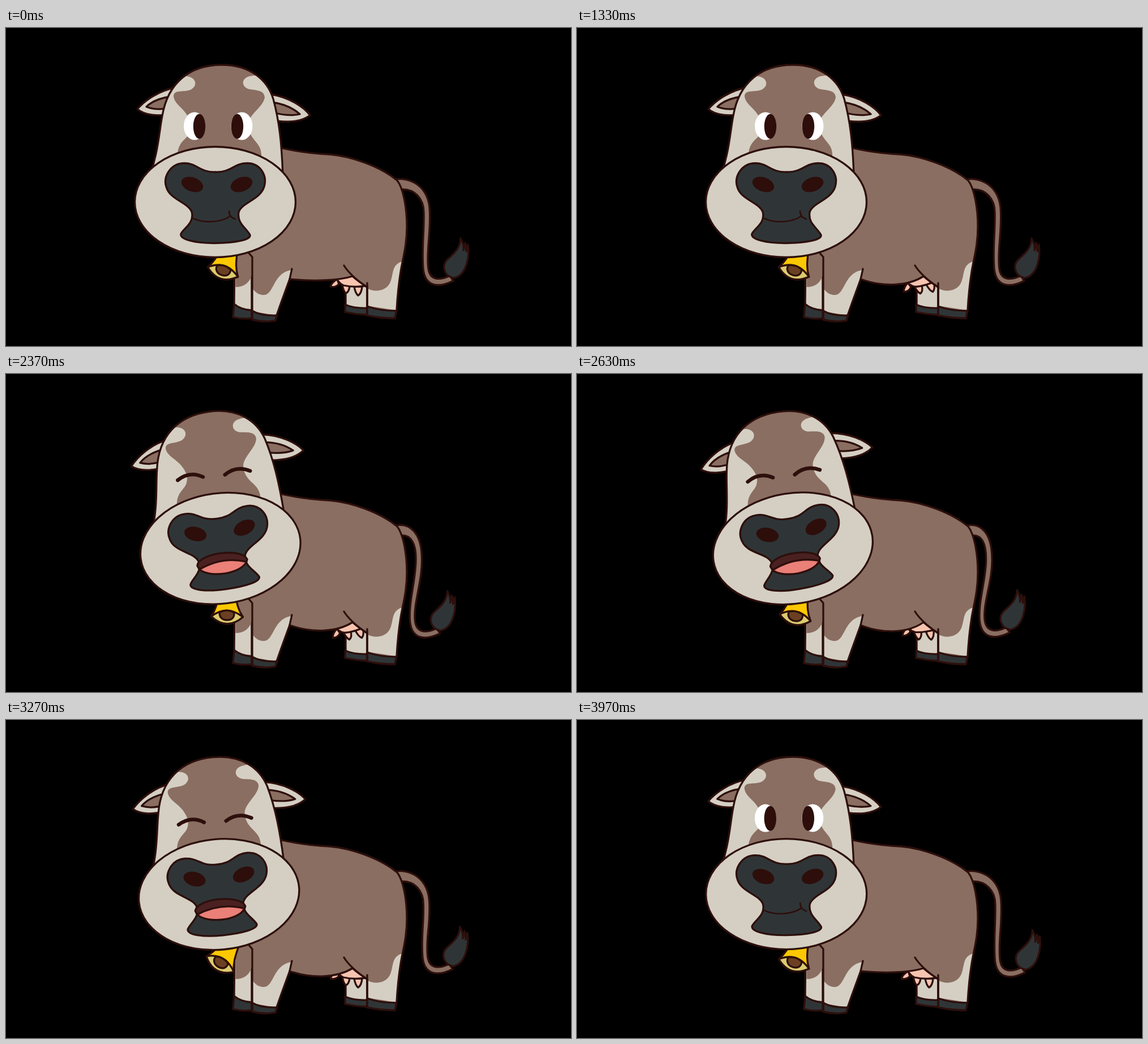
An HTML page that plays this animation: 998x561 px, repeating every 4010 ms.

```html
<!DOCTYPE html>
<html lang="en">
<head>
<meta charset="utf-8">
<title>Cow</title>
<style>
html, body { margin: 0; width: 100%; height: 100%; overflow: hidden; background: #000; }
svg { display: block; width: 100vw; height: 100vh; }
.line { stroke: #2d0f0c; stroke-width: 3.3; stroke-linejoin: round; stroke-linecap: round; }
.brown { fill: #8a6e61; }
.light { fill: #d5cfc3; }
.dark { fill: #2f3537; }
.ink { fill: #2d0e0b; }
.pink { fill: #f7c4af; }
.none { fill: none; }
</style>
</head>
<body>
<svg viewBox="0 0 998 561">
  <defs>
    <path id="skull" d="M250 270C269 225 270 185 276 155C286 96 325 65 381 65C432 65 462 92 472 125C483 165 487 205 489 260L480 300H270Z"/>
    <clipPath id="skullClip"><use href="#skull"/></clipPath>
  </defs>

  <path id="tail" class="brown line"/>
  <path id="tuft" class="dark line" d="M791 441C774 438 769 420 779 409C792 397 802 390 803 371C807 379 809 386 808 392C810 388 811 383 811 379C813 385 813 391 813 394C815 390 816 386 816 382C819 402 814 436 791 441Z"/>

  <g id="farLegs">
    <path class="light line" d="M404 395L403 487 401 510Q418 514 434 512V395Z"/>
    <path class="brown" d="M405.500 395V457C420 457 430 450 434 436V395Z"/>
    <path class="dark line" d="M403 487Q415 497 434 498V512Q418 514 401 510Z"/>
    <path class="light line" d="M600 440V488L599 501Q620 505 638 506V440Z"/>
    <path class="dark line" d="M599 488Q615 495 638 494V506Q618 505 599 501Z"/>
  </g>

  <g id="udder" class="pink line">
    <path d="M585 443Q575 449 573 456Q581 459 588 452Z"/>
    <path d="M594 453Q596 464 600 468Q606 466 607 455Z"/>
    <path d="M615 456Q617 468 622 472Q628 468 629 456Z"/>
    <path d="M582 436Q586 450 596 454Q614 458 634 455L630 430Z"/>
  </g>

  <path id="body" class="brown"/>
  <path class="light" d="M435 459C440 466 446 471 455 471C466 471 470 457 477 446C485 433 495 428 505 427L501 443 485 487 478 507 435 500Z"/>
  <path class="light" d="M638 459C650 467 672 465 679 448C685 433 681 417 700 412L697 430C693 455 691 480 690 498L638 490Z"/>
  <path class="dark line" d="M435 499Q450 508 479 507L476 516Q456 520 435 515Z"/>
  <path class="dark line" d="M638 491Q660 499 690 499L687 512Q665 513 638 507Z"/>
  <path id="bodyLine" class="none line"/>
  <path class="none line" d="M597 419C605 432 620 445 637 457M638 450V507M505 425L501 443"/>

  <g id="bell">
    <path fill="#fcc800" class="line" d="M377 385C373 405 371 415 363 428H419C410 415 408 405 404 385Z"/>
    <path fill="#dccb6e" class="line" d="M363 428Q390 406 419 428Q391 453 363 428Z"/>
    <path fill="#6b4022" class="line" d="M378 420Q391 414 403 420C405 430 398 434 391 434C383 434 376 429 378 420Z"/>
  </g>

  <g id="head">
    <path class="light line" d="M300 105C270 110 245 128 232 143C245 154 268 156 290 152Z"/>
    <path class="brown line" d="M290 121C270 124 256 131 248 139C260 144 275 144 288 141Z"/>
    <path class="light line" d="M468 117C500 122 526 139 537 154C522 165 503 167 478 164Z"/>
    <path class="brown line" d="M470 131C492 134 508 142 519 152C505 155 492 154 475 150Z"/>
    <use href="#skull" class="light"/>
    <path class="brown" clip-path="url(#skullClip)" d="M314 85C335 84 341 101 326 109C312 114 297 108 296 120C297 133 311 140 318 151C327 164 329 175 325 184C321 196 305 198 303 222V240H451V222C450 200 428 197 428 170C428 152 455 140 457 122C456 110 443 110 430 108C414 104 415 86 434 84.500C440 83 447 85 454 84L430 50H330Z"/>
    <use href="#skull" class="none line"/>
    <g id="awakeEyes">
      <ellipse cx="333" cy="173" rx="19" ry="24.500" fill="#fff"/>
      <ellipse cx="341.500" cy="173.500" rx="10.700" ry="22" class="ink"/>
      <ellipse cx="416.500" cy="173" rx="19" ry="24.500" fill="#fff"/>
      <ellipse cx="408.500" cy="173.500" rx="10.700" ry="22" class="ink"/>
    </g>
    <path id="shutEyes" class="none line" style="stroke-width:6.500" d="M310 178Q333 164 355 178M394 179Q416 165 439 178"/>
    <ellipse class="light line" cx="369.500" cy="307" rx="142" ry="97.500"/>
    <path class="dark line" d="M370 254C342 255 338 238.500 315 238.500C291 238.500 277 262 283 280C289 303 321 307 328 324C333 344 315 352 309 363C306 373 335 380 370 379.500C405 379 433 374 431 365C424 352 408 345 411 325C416 308 449 303 456 280C462 260 449 238.500 426 238.500C402 238.500 398 255 370 254Z"/>
    <ellipse class="ink" cx="329" cy="276" rx="20" ry="12.500" transform="rotate(20 329 276)"/>
    <ellipse class="ink" cx="416" cy="276" rx="20" ry="12.500" transform="rotate(-20 416 276)"/>
    <path id="smile" class="none line" style="stroke-width:2.700" d="M331 336C350 345 380 343 396 332M394 323C394 330 398 335 405 337"/>
    <g id="moo">
      <path fill="#4a2020" class="line" d="M325 332C330 310 408 310 414 332C408 357 330 357 325 332Z"/>
      <path fill="#ea8078" class="line" d="M328 339Q370 321 412 336C400 356 345 357 328 339Z"/>
    </g>
  </g>
</svg>
<script>
const LOOP = 4010, MOVE = 1600, PEAK = 2660;
const $ = id => document.getElementById(id);

// Soft-edged ramp from 0 to 1 between two times.
function ramp(t, from, to) {
  const u = Math.min(1, Math.max(0, (t - from) / (to - from)));
  return (u + u * u * (3 - 2 * u)) / 2;
}

// Sway that fades in and out while the cow moos.
function sway(t, beats, decay = 0) {
  const u = Math.max(0, (t - MOVE) / (LOOP - MOVE));
  return Math.sin(Math.PI * u) * Math.sin(2 * Math.PI * beats * u) * Math.exp(-decay * u);
}

function tailPath(dx, dy) {
  const mid = (x, y) => `${x + dx * .6} ${y} `;
  const low = (x, y) => `${x + dx} ${y + dy} `;
  return `M684 268C712 261 ${mid(748, 278)}${mid(748.5, 325)}`
    + `C${mid(750, 365)}${low(742, 395)}${low(746, 425)}`
    + `C${low(749, 445)}${low(765, 446)}${low(784, 437)}`
    + `L${low(790, 446)}C${low(762, 460)}${low(740, 455)}${low(737, 425)}`
    + `C${low(734, 390)}${mid(739, 360)}${mid(738, 325)}`
    + `C${mid(738, 302)}${722 + dx * .2} 282 696 285Z`;
}

function bodyPath(sag) {
  return 'M435 514V404L428 396 420 300 440 208 487 212C520 219 545 222 572 223'
    + 'C608 226 660 243 691 269C702 283 708 318 708 350C708 385 701 405 697 430'
    + 'C693 455 691 480 690 498L687 512Q665 512 638 507V457C630 452 620 445 612 438'
    + `C586 ${446 + sag * .8} 542 ${447 + sag} 501 443L485 487 478 507 476 516Q456 520 435 514Z`;
}

function move(id, transform) { $(id).setAttribute('transform', transform); }
function show(id, on) { $(id).style.display = on ? '' : 'none'; }

function render(t) {
  const tilt = 9.5 * (ramp(t, MOVE, PEAK) - ramp(t, PEAK, LOOP));
  const ring = 17.8 - 36 * sway(t, 1.07, 1.3);
  const tailX = -28 * sway(t, .71), tailY = 14 * sway(t, .86);
  const breathIn = ramp(t, 0, 1300), deepen = ramp(t, 2370, 2930), breathOut = ramp(t, 2930, 3900);
  const body = bodyPath(11 * breathIn + 4 * deepen - 15 * breathOut);
  const mooing = t >= 1700 && t < 3400;

  move('head', `rotate(${-tilt} 380 235)`);
  move('bell', `translate(0 ${ring * .2}) rotate(${ring} 391 402)`);
  move('udder', `rotate(${18 * (deepen - breathIn)} 605 448)`);
  move('tuft', `translate(${tailX} ${tailY})`);
  $('tail').setAttribute('d', tailPath(tailX, tailY));
  $('body').setAttribute('d', body);
  $('bodyLine').setAttribute('d', body);
  show('awakeEyes', !mooing);
  show('smile', !mooing);
  show('shutEyes', mooing);
  show('moo', mooing);
}

const start = performance.now();
function tick() {
  render((performance.now() - start) % LOOP);
  requestAnimationFrame(tick);
}
tick();
</script>
</body>
</html>
```
